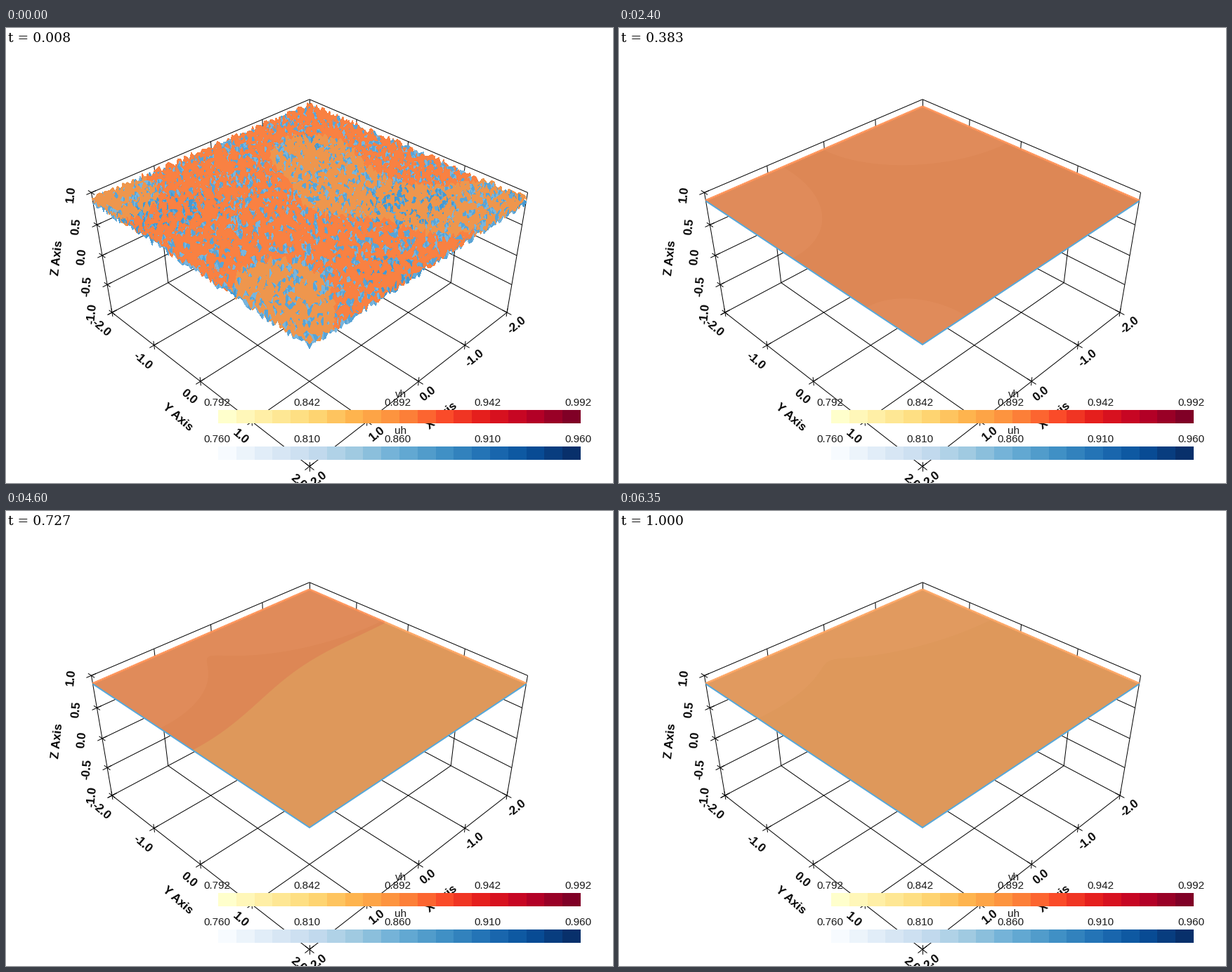
Write a matplotlib script that moves like this. It is 864 px wide and 648 px high and loops after 6400 ms.

```python
import numpy as np
import matplotlib.pyplot as plt
from matplotlib.animation import FuncAnimation
from matplotlib.collections import LineCollection, PolyCollection

W, H, DPI = 864, 648, 100
FRAMES = 128
PT = 72 / DPI                       # points per pixel
DIST = 3 / np.sin(np.pi / 12)       # camera distance
FOCAL = H / 2 / np.tan(np.pi / 12)  # 30 degree view angle

ORANGE, AMBER = "#dd8755", "#de985b"
RIM_ORANGE, RIM_AMBER = "#fe9358", "#fda664"
BLUE = "#56a8da"
PALE = (0.98, 0.69, 0.51, 0.12)


def project(x, y, z):
    """Isometric perspective view: screen x, screen y, depth."""
    x, y, z = np.broadcast_arrays(x, y, z)
    depth = DIST - (x + y + z) / np.sqrt(3)
    sx = W / 2 + FOCAL * (y - x) / np.sqrt(2) / depth
    sy = H / 2 - FOCAL * (2 * z - x - y) / np.sqrt(6) / depth
    return sx, sy, depth


def path(points):
    sx, sy, _ = project(*np.array(points, float).T)
    return np.column_stack([sx, sy])


fig = plt.figure(figsize=(W / DPI, H / DPI), dpi=DPI, facecolor="white")
ax = fig.add_axes([0, 0, 1, 1])
ax.axis("off")

# ---- box, ticks and axis labels ----
STEPS = range(-2, 3)
LEVELS = np.linspace(-1, 1, 5)


def box_lines():
    segs = []
    for v in STEPS:
        segs += [[(v, -2, -1), (v, 2, -1)], [(-2, v, -1), (2, v, -1)],
                 [(v, -2, -1), (v, -2, 1)], [(-2, v, -1), (-2, v, 1)]]
    for z in LEVELS[1:]:
        segs += [[(-2, -2, z), (2, -2, z)], [(-2, -2, z), (-2, 2, z)]]
    return segs


def cross(point, axes, d=0.075):
    arms = d * np.eye(3)[list(axes)]
    return [[point - arm, point + arm] for arm in arms]


def label(x, y, s, size, angle=0, z=2, **kw):
    kw = {"ha": "center", "va": "center", "family": "Liberation Sans", **kw}
    return ax.text(x, y, s, fontsize=size * PT, rotation=angle, zorder=z, **kw)


def axis(name, place, values, free, offset, angle, title_at):
    """Tick crosses, numbers beside them and the axis title."""
    segs = []
    for v in values:
        point = np.array(place(v), float)
        segs += cross(point, free)
        label(*(path([point])[0] + offset), f"{v:.1f}", 17, angle, weight="bold")
    label(*title_at, name, 17, angle, weight="bold")
    return segs


segs = box_lines()
segs += axis("X Axis", lambda v: (v, 2, -1), STEPS, (1, 2), (14, 18), 39, (620, 552))
segs += axis("Y Axis", lambda v: (2, v, -1), STEPS, (0, 2), (-16, 22), -41, (244, 554))
segs += axis("Z Axis", lambda v: (2, -2, v), LEVELS, (0, 1), (-29, 2), 84, (73, 327))
ax.add_collection(LineCollection([path(s) for s in segs], colors="black",
                                 linewidths=PT, zorder=1))


# ---- colour bars ----
def color_bar(top, cmap, name, low):
    ax.imshow(np.arange(20)[None], cmap=plt.get_cmap(cmap, 20), aspect="auto",
              extent=(302, 818, top + 19, top), interpolation="nearest", zorder=5)
    for k in range(5):
        label(300 + 128.6 * k, top - 10, f"{low + 0.05 * k:.3f}", 15.3, z=6, color="#1a1a1a")
    label(562, top - 22, name, 15.3, z=6, color="#1a1a1a")


color_bar(544, "YlOrRd", "vh", 0.792)
color_bar(596, "Blues", "uh", 0.760)
clock = label(3, 20, "", 18.8, z=6, family="DejaVu Serif", ha="left", va="baseline")

# ---- fields on the sheets ----
PATCHES = [(-0.9, -0.9), (-0.45, 0.25), (-0.9, 1.3), (-1.8, 1.9), (1.8, -1.7), (1.6, 1.1)]
rng = np.random.default_rng(4)
MODES = [(i, j, rng.normal()) for i in range(5) for j in range(5) if i + j > 1]


def early_noise(x, y):
    return sum(c / (1 + i + j) * np.cos(i * np.pi * (x + 2) / 4) * np.cos(j * np.pi * (y + 2) / 4)
               for i, j, c in MODES)


def fading(t):
    return np.exp(-(t - 1 / FRAMES) / 0.06)


def light_field(x, y, t):
    """Positive where the lower sheet has the paler blue: ellipses at three corners."""
    decay = np.exp(-t / 0.3)
    front = np.sqrt(max(3.14 * (0.56 - t), 1e-4))
    corners = [(2, -2, 0.95 + 0.8 * t, 2.25 - 1.1 * t),
               (-2, -2, 2.8 * (1 - decay), 1.4 + 1.2 * decay),
               (2, 2, 0.88 * front, 1.15 * front)]
    total = 0
    for cx, cy, rx, ry in corners:
        e = ((x - cx) / rx) ** 2 + ((y - cy) / ry) ** 2
        total = total + np.exp(8 * (1 - np.minimum(e, 20)))
    return np.log(total) / 8 + 1.5 * fading(t) * early_noise(x, y)


def amber_field(x, y, t):
    """Positive where the upper sheet is in the lower colour band."""
    a, b = np.sin(np.pi * x / 4), np.sin(np.pi * y / 4)
    s = t - 0.641
    front = b - (0.7 - 11.3 * s) - (0.685 - 5.75 * s) * a - (0.275 - 1.6 * s) * a * a
    spots = sum(np.exp(-((x - px) ** 2 + (y - py) ** 2) / 0.4) for px, py in PATCHES)
    spots = spots + 0.15 * early_noise(x, y)
    return np.maximum(front, spots * fading(t) - 0.45)


# ---- smooth sheets ----
u = np.linspace(-2, 2, 121)
GX, GY = np.meshgrid(u, u)
SX, SY, _ = project(GX, GY, 0.877)
sheet = ax.fill(*path([(-2, -2, 0.877), (2, -2, 0.877), (2, 2, 0.877), (-2, 2, 0.877)]).T,
                color=ORANGE, lw=0, zorder=3)[0]

back = np.concatenate([np.column_stack([u[::-1], 0 * u - 2]),
                       np.column_stack([0 * u - 2, u])])
mid = (back[:-1] + back[1:]) / 2
rim_pts = path(np.column_stack([back, np.full(len(back), 0.88)]))
rim = LineCollection(np.stack([rim_pts[:-1], rim_pts[1:]], 1), linewidths=2.8 * PT, zorder=4)
ax.add_collection(rim)
edge, = ax.plot(*path([(2, -2, 0.872), (2, 2, 0.872), (-2, 2, 0.872)]).T,
                color=BLUE, lw=2 * PT, zorder=4.1, solid_joinstyle="miter",
                solid_capstyle="butt")


# ---- rough start ----
def rough_sheets(n=100, height=0.072):
    g = np.linspace(-2, 2, n + 1)
    x, y = (m.ravel() for m in np.meshgrid(g, g))
    k = np.arange((n + 1) ** 2).reshape(n + 1, n + 1)
    a, b, c, d = (m.ravel() for m in (k[:-1, :-1], k[:-1, 1:], k[1:, 1:], k[1:, :-1]))
    tri = np.concatenate([np.column_stack([a, b, c]), np.column_stack([a, c, d])])
    mx, my = x[tri].mean(1), y[tri].mean(1)

    amber = amber_field(mx, my, 1 / FRAMES) > 0
    warm = np.where(amber[:, None], (0.935, 0.59, 0.3), (0.975, 0.505, 0.26))
    shade = np.where(early_noise(mx, my) < -0.5, 0, 0.4) + 0.6 * (rng.random(len(tri)) < 0.4)
    cool = np.array([0.27, 0.6, 0.82]) + shade[:, None] * (0.2, 0.11, 0.045)

    polys, depths = [], []
    for mean in (0.864, 0.889):
        z = mean + rng.uniform(-height, height, x.size)
        sx, sy, depth = project(x, y, z)
        polys.append(np.stack([sx[tri], sy[tri]], -1))
        depths.append(depth[tri].mean(1))
    order = np.argsort(-np.concatenate(depths))
    colors = np.concatenate([cool, warm])[order]
    return PolyCollection(np.concatenate(polys)[order], facecolors=colors, edgecolors=colors,
                          linewidths=0.2, antialiaseds=False, zorder=3)


rough = rough_sheets()
ax.add_collection(rough)
ax.set_xlim(0, W)
ax.set_ylim(H, 0)

bands = []


def fill_band(field, color, z):
    if (field > 0).any():
        bands.append(ax.contourf(SX, SY, field, levels=[0, 1e6], colors=[color],
                                 antialiased=True, zorder=z))


def draw(i):
    t = (i + 1) / FRAMES
    clock.set_text(f"t = {t:.3f}")
    while bands:
        bands.pop().remove()
    rough.set_visible(i == 0)
    for artist in (sheet, rim, edge):
        artist.set_visible(i > 0)
    if i > 0:
        fill_band(amber_field(GX, GY, t), AMBER, 3.1)
        fill_band(light_field(GX, GY, t), PALE, 3.2)
        low = amber_field(*mid.T, t) > 0
        rim.set_color([RIM_AMBER if v else RIM_ORANGE for v in low])
    return []


anim = FuncAnimation(fig, draw, frames=FRAMES, interval=50, repeat=True, repeat_delay=0)
plt.show()
```
